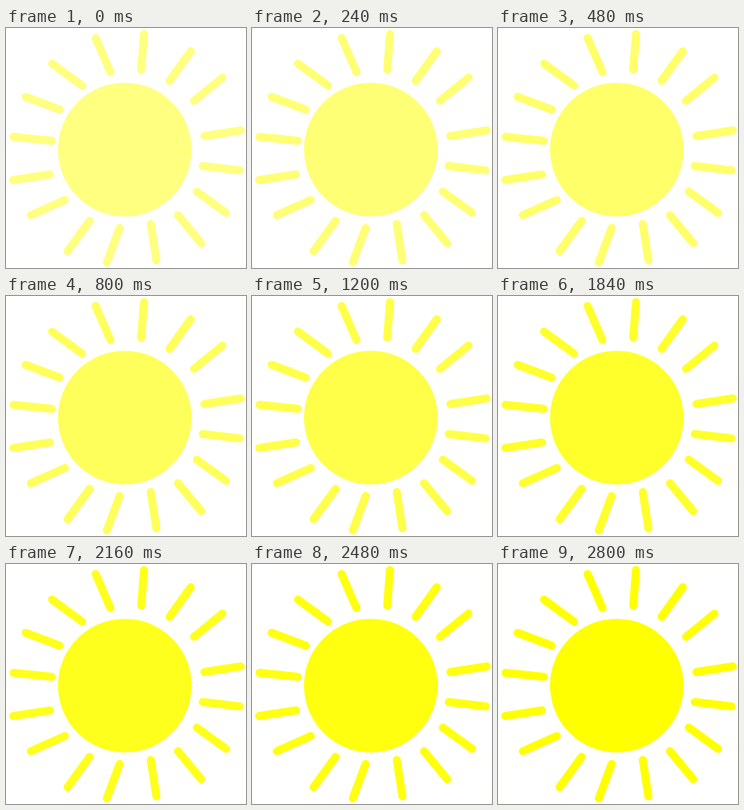
These frames come from a looping animation (300 by 300 pixels, 2880 ms). An HTML page with a canvas:

```html
<!DOCTYPE html>
<html lang="en">
<head>
<meta charset="utf-8">
<title>Sun</title>
<style>
  html, body { margin: 0; width: 100%; height: 100%; overflow: hidden; background: #fff; }
  canvas { display: block; }
</style>
</head>
<body>
<canvas id="stage" width="300" height="300"></canvas>
<script>
const ctx = document.getElementById('stage').getContext('2d');
const STEP = 80;
const STEPS = 36;
const START_BLUE = 128;

// Hand-drawn rays, clockwise from the top: outer x, y, inner x, y
const rays = [
  [172.5, 7.5, 169, 52], [231, 29, 204.5, 66],
  [270.5, 62, 235, 91], [293.5, 128, 248, 135],
  [292, 178, 246, 172.5], [275, 231, 238.5, 204.5],
  [244, 269, 215, 234], [188, 290.5, 181, 245],
  [126, 293, 142, 250], [77, 279, 104.5, 241],
  [31, 234, 73.5, 215], [9, 190, 55, 183],
  [9.5, 136, 57, 141], [24.5, 86, 67, 102],
  [57.5, 44.5, 95, 72], [112, 12.5, 130.5, 55]
];

function drawSun(color) {
  ctx.fillStyle = '#fff';
  ctx.fillRect(0, 0, 300, 300);
  ctx.fillStyle = ctx.strokeStyle = color;

  ctx.beginPath();
  ctx.arc(148.5, 152, 83.5, 0, Math.PI * 2);
  ctx.fill();

  ctx.lineWidth = 10;
  ctx.lineCap = 'round';
  ctx.beginPath();
  for (const [x1, y1, x2, y2] of rays) {
    ctx.moveTo(x1, y1);
    ctx.lineTo(x2, y2);
  }
  ctx.stroke();
}

const start = performance.now();

function render() {
  const elapsed = Math.max(0, performance.now() - start);
  const step = Math.floor(elapsed / STEP) % STEPS;
  const blue = Math.round(START_BLUE * (1 - step / (STEPS - 1)));
  drawSun(`rgb(255, 255, ${blue})`);
  requestAnimationFrame(render);
}
render();
</script>
</body>
</html>
```
